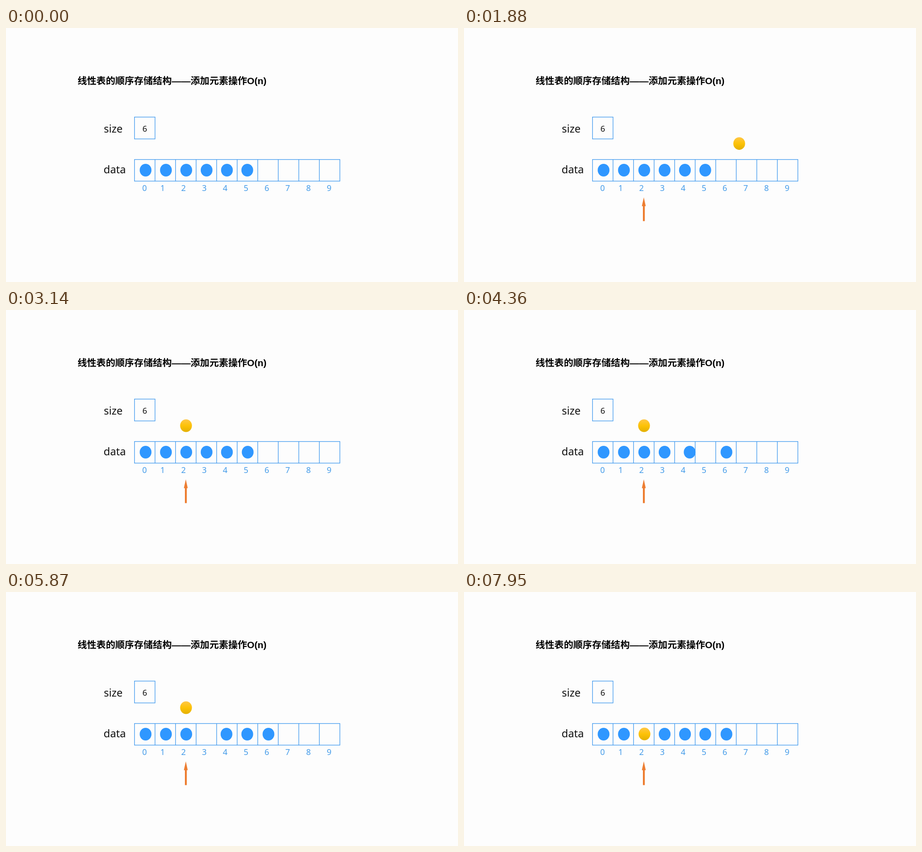
Recreate the animation shown at these times as an HTML page with a canvas. Size 998 by 561 pixels, loop 7.99 s.

```html
<!DOCTYPE html>
<html lang="zh-CN">
<head>
<meta charset="utf-8">
<title>添加元素操作</title>
<style>
html, body { margin: 0; width: 100%; height: 100%; overflow: hidden; background: #fdfdfd; }
canvas { display: block; }
</style>
</head>
<body>
<canvas id="stage" width="998" height="561"></canvas>
<script>
const ctx = document.getElementById('stage').getContext('2d');
const LOOP = 7990;
const BLUE = '#2f97ff';
const LINE = '#3d98ee';
const LABEL = '"Noto Sans", "Open Sans", sans-serif';
const TITLE = 'bold 20.8px "Liberation Sans", "Noto Sans CJK SC", "Noto Sans CJK", sans-serif';
const CELL = 45.35, LEFT = 283.7, ROW = 314;
const indexX = [306, 346, 392, 438, 484, 530, 576, 622, 668, 713.5];

// Shifts to the right: ball number, start time, final x
const shifts = [[5, 3040, 579.5], [4, 4020, 532.7], [3, 4985, 488], [2, 6010, 443]];

const clamp = v => Math.max(0, Math.min(1, v));
const mix = (a, b, p) => a + (b - a) * p;
const ramp = (t, start, length) => clamp((t - start) / length);
const ease = u => u < 0.5 ? 2 * u * u : 1 - 2 * (1 - u) * (1 - u);
const move = (t, start, length) => ease(ramp(t, start, length));

function text(str, x, y, font, color, align = 'left') {
  ctx.font = font;
  ctx.fillStyle = color;
  ctx.textAlign = align;
  ctx.fillText(str, x, y);
}

function ball(x, y, fill) {
  ctx.fillStyle = fill;
  ctx.beginPath();
  ctx.ellipse(x, y, 13, 14, 0, 0, Math.PI * 2);
  ctx.fill();
}

function yellowBall(x, y) {
  const g = ctx.createLinearGradient(0, y - 14, 0, y + 14);
  g.addColorStop(0, '#ffc746');
  g.addColorStop(0.5, '#fdc207');
  g.addColorStop(1, '#e3b000');
  ball(x, y, g);
}

function arrow() {
  ctx.fillStyle = '#ed7d31';
  ctx.beginPath();
  ctx.moveTo(397, 374);
  ctx.lineTo(401.3, 393.5);
  ctx.lineTo(399.2, 393.5);
  ctx.lineTo(399.2, 426.6);
  ctx.lineTo(395, 426.6);
  ctx.lineTo(395, 393.5);
  ctx.lineTo(392.7, 393.5);
  ctx.fill();
}

function table() {
  text('线性表的顺序存储结构——添加元素操作O(n)', 158, 124.3, TITLE, '#000');
  text('size', 216, 231, '300 23.4px ' + LABEL, '#111');
  text('data', 215.5, 321, '300 23.4px ' + LABEL, '#111');
  text('6', 306.3, 228.5, '300 18px ' + LABEL, '#111', 'center');

  ctx.strokeStyle = LINE;
  ctx.lineWidth = 1.3;
  ctx.strokeRect(LEFT, 196.7, CELL, 48.3);
  ctx.strokeRect(LEFT, 290.5, CELL * 10, 47.7);
  ctx.beginPath();
  for (let i = 1; i < 10; i++) {
    ctx.moveTo(LEFT + CELL * i, 290.5);
    ctx.lineTo(LEFT + CELL * i, 338.2);
  }
  ctx.stroke();
  indexX.forEach((x, i) => text(String(i), x, 360.3, '300 18px ' + LABEL, '#459ce9', 'center'));
}

function draw(t) {
  ctx.globalAlpha = 1;
  ctx.fillStyle = '#fdfdfd';
  ctx.fillRect(0, 0, 998, 561);
  table();

  const xs = Array.from({ length: 6 }, (_, i) => 308.2 + 44.9 * i);
  for (const [n, start, end] of shifts) xs[n] = mix(xs[n], end, move(t, start, 1000));
  xs.forEach(x => ball(x, ROW, BLUE));

  const across = move(t, 1005, 2000);
  const down = move(t, 7040, 1000);
  ctx.globalAlpha = ramp(t, 20, 480);
  yellowBall(mix(738.5, 397.5, across) + down, mix(mix(255, 255.5, across), 314.5, down));

  ctx.globalAlpha = ramp(t, 500, 500);
  arrow();
}

function tick() {
  draw(performance.now() % LOOP);
  requestAnimationFrame(tick);
}
tick();
</script>
</body>
</html>
```
